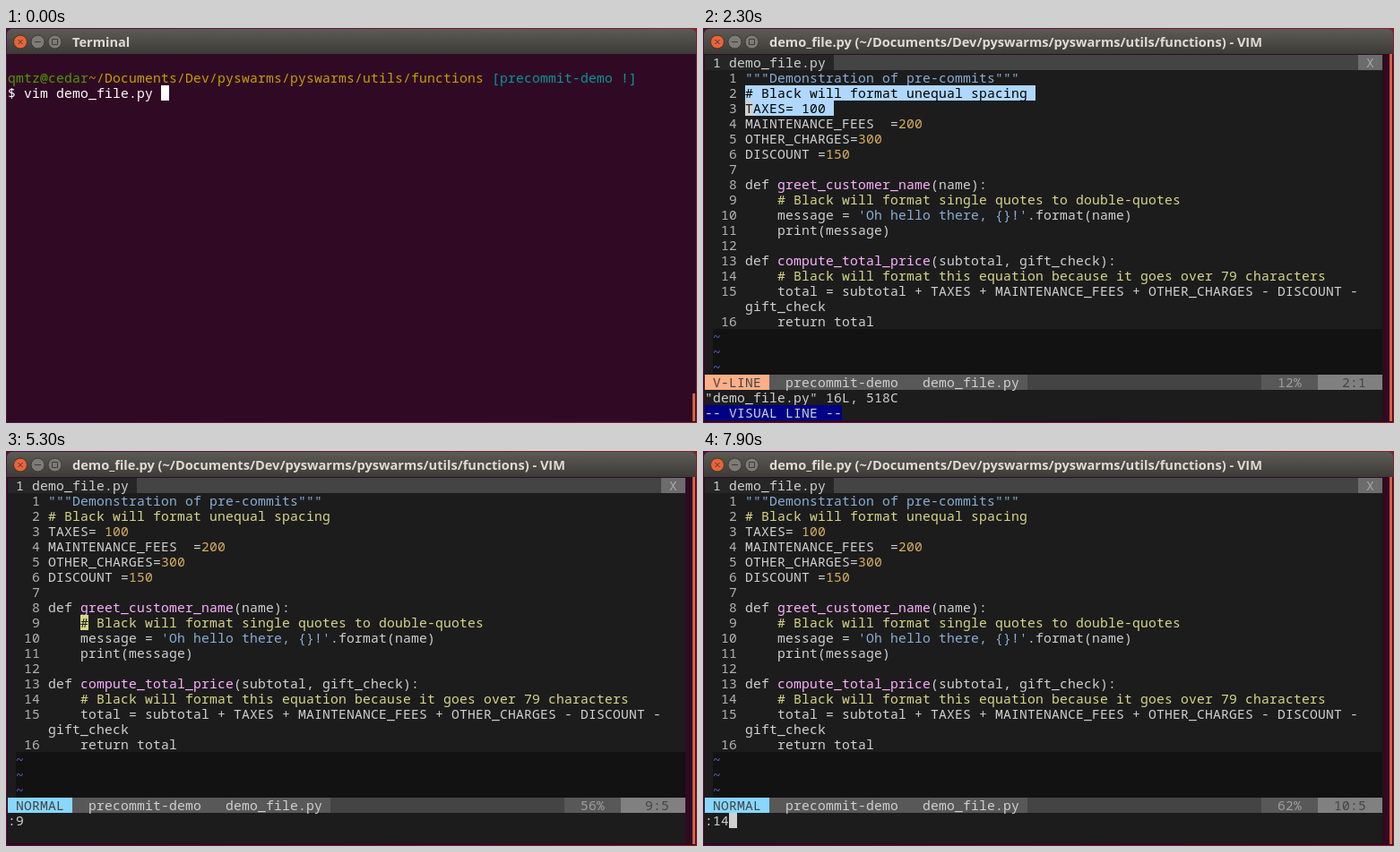
Recreate the animation shown at these times as an HTML page with a canvas. Size 771 by 441 pixels, loop 8000 ms.

```html
<!DOCTYPE html>
<html lang="en">
<head>
<meta charset="utf-8">
<title>Terminal</title>
<style>
html, body { margin: 0; width: 100%; height: 100%; overflow: hidden; background: #300a24; }
canvas { display: block; }
</style>
</head>
<body>
<canvas id="stage" width="771" height="441"></canvas>
<script>
const ctx = document.getElementById('stage').getContext('2d');
const LOOP = 8000;
const X0 = 2, Y0 = 30, CW = 9, CH = 17, COLS = 84, TEXT_COL = 5;
const MONO = '14.67px "Noto Sans Mono", "DejaVu Sans Mono", monospace';
const TITLE = 'bold 14.6px "Open Sans", "Noto Sans", sans-serif';

const BG = '#300a24', VIM = '#1c1c1c', FG = '#d0d0d0';
const COMMENT = '#d7d787', STR = '#87afd7', NUM = '#d7af5f', FUNC = '#ffafff';
const SELECT = '#afd7ff';

// Each line is a list of [text, colour] runs.
const CODE = [
  [['"""Demonstration of pre-commits"""', STR]],
  [['# Black will format unequal spacing', COMMENT]],
  [['TAXES= '], ['100', NUM]],
  [['MAINTENANCE_FEES  ='], ['200', NUM]],
  [['OTHER_CHARGES='], ['300', NUM]],
  [['DISCOUNT ='], ['150', NUM]],
  [],
  [['def '], ['greet_customer_name', FUNC], ['(name):']],
  [['    # Black will format single quotes to double-quotes', COMMENT]],
  [['    message = '], ["'Oh hello there, {}!'", STR], ['.format(name)']],
  [['    print(message)']],
  [],
  [['def '], ['compute_total_price', FUNC], ['(subtotal, gift_check):']],
  [['    # Black will format this equation because it goes over 79 characters', COMMENT]],
  [['    total = subtotal + TAXES + MAINTENANCE_FEES + OTHER_CHARGES - DISCOUNT -']],
  [['    return total']]
];
const WRAP_LINE = 15, WRAP_TEXT = 'gift_check';
const FILE_MSG = '"demo_file.py" 16L, 518C';

// Editor states: each entry changes some fields at its time.
const STEPS = [
  [700, { line: 2, col: 0, pos: 2, from: 0, cmd: FILE_MSG, typing: false, on: true }],
  [1800, { from: 2 }],
  [2300, { line: 3 }],
  [2400, { pos: 3 }],
  [2700, { line: 4, pos: 4 }],
  [3100, { line: 5, pos: 5 }],
  [3600, { line: 6, pos: 6 }],
  [4000, { on: false }],
  [4200, { on: true }],
  [4700, { from: 0 }],
  [4800, { cmd: ':', typing: true }],
  [5100, { cmd: ':9' }],
  [5300, { line: 9, pos: 9, col: 4, typing: false }],
  [6000, { from: 9 }],
  [6200, { line: 10, pos: 10 }],
  [6800, { on: false }],
  [7000, { on: true }],
  [7300, { from: 0, cmd: ':', typing: true }],
  [7700, { cmd: ':1' }],
  [7900, { cmd: ':14' }]
];

function rect(x, y, w, h, color) {
  ctx.fillStyle = color;
  ctx.fillRect(x, y, w, h);
}

function cells(col, row, n, color) {
  rect(X0 + col * CW, Y0 + row * CH, n * CW, CH, color);
}

function put(col, row, text, color = FG) {
  ctx.font = MONO;
  ctx.fillStyle = color;
  for (let i = 0; i < text.length; i++) {
    if (text[i] !== ' ') ctx.fillText(text[i], X0 + (col + i) * CW, Y0 + row * CH + 14);
  }
}

function label(col, row, text, color, bg) {
  cells(col, row, text.length, bg);
  put(col, row, text, color);
}

function button(x, fill, ring, mark) {
  const y = 15.5;
  ctx.beginPath();
  ctx.arc(x, y, 7.5, 0, Math.PI * 2);
  ctx.fillStyle = fill;
  ctx.fill();
  ctx.lineWidth = 1;
  ctx.strokeStyle = ring;
  ctx.stroke();
  ctx.beginPath();
  if (mark === 'close') {
    ctx.moveTo(x - 2.5, y - 2.5);
    ctx.lineTo(x + 2.5, y + 2.5);
    ctx.moveTo(x + 2.5, y - 2.5);
    ctx.lineTo(x - 2.5, y + 2.5);
  } else if (mark === 'min') {
    ctx.moveTo(x - 3.5, y);
    ctx.lineTo(x + 3.5, y);
  } else {
    ctx.rect(x - 3, y - 3, 6, 6);
  }
  ctx.strokeStyle = '#3c3b37';
  ctx.stroke();
}

function drawWindow(title, thumbTop) {
  const edge = ctx.createLinearGradient(0, 0, 771, 0);
  edge.addColorStop(0, '#4b1240');
  edge.addColorStop(1, '#84222c');
  rect(0, 0, 771, 441, edge);
  rect(1, 20, 769, 420, BG);

  const bar = ctx.createLinearGradient(0, 1, 0, 29);
  bar.addColorStop(0, '#5c5b55');
  bar.addColorStop(1, '#3c3b37');
  ctx.fillStyle = bar;
  ctx.beginPath();
  ctx.roundRect(1, 1, 769, 28, [6, 6, 0, 0]);
  ctx.fill();

  button(16, '#e8633a', '#4a3028', 'close');
  button(35.5, '#7d7b73', '#3a3935', 'min');
  button(54.5, '#7d7b73', '#3a3935', 'max');
  ctx.font = TITLE;
  ctx.fillStyle = '#dfdbd2';
  ctx.fillText(title, 74, 21);

  rect(766, thumbTop, 3, 439 - thumbTop, '#d9603f');
}

function drawShell(t) {
  drawWindow('Terminal', t < 600 ? 408 : 29);
  put(0, 1, 'qmtz@cedar', '#4e9a06');
  put(10, 1, '~/Documents/Dev/pyswarms/pyswarms/utils/functions', '#c4a000');
  put(60, 1, '[precommit-demo !]', '#06989a');
  put(0, 2, '$ vim demo_file.py', '#ffffff');
  if (t < 400) cells(19, 2, 1, '#ffffff');
  else cells(0, 3, 1, '#ffffff');
}

function rowOf(line) {
  return line > WRAP_LINE ? line + 1 : line;
}

function drawCode(s) {
  CODE.forEach((runs, i) => {
    const line = i + 1, row = rowOf(line);
    const picked = s.from && line >= s.from && line <= s.line;
    const text = runs.map(r => r[0]).join('');
    put(1, row, String(line).padStart(3), '#b2b2b2');
    if (picked) cells(TEXT_COL, row, text.length + 1, SELECT);
    let col = TEXT_COL;
    for (const [part, color] of runs) {
      put(col, row, part, picked ? '#000000' : color);
      col += part.length;
    }
    if (line === s.line && !s.typing) {
      const color = text[0] === '#' || text[s.col] === '#' ? COMMENT : FG;
      label(TEXT_COL + s.col, row, text[s.col], s.on ? VIM : color, s.on ? color : VIM);
    }
  });
  put(TEXT_COL, WRAP_LINE + 1, WRAP_TEXT);
}

function drawStatus(s) {
  const visual = s.from > 0;
  const percent = Math.floor(s.pos * 100 / CODE.length) + '%';
  cells(0, 21, COLS, '#444444');
  label(0, 21, visual ? ' V-LINE ' : ' NORMAL ', '#444444', visual ? '#ffaf87' : '#87d7ff');
  label(8, 21, '  precommit-demo   demo_file.py ', FG, '#585858');
  label(69, 21, '  ' + percent + '  ', '#9e9e9e', '#585858');
  label(76, 21, (s.pos + ':' + (s.col + 1)).padStart(6) + '  ', '#444444', '#808080');
  put(0, 22, s.cmd);
  if (s.typing) cells(s.cmd.length, 22, 1, FG);
  if (visual) label(0, 23, '-- VISUAL LINE --', FG, '#000087');
}

function drawEditor(t) {
  const s = {};
  for (const [at, change] of STEPS) if (t >= at) Object.assign(s, change);
  drawWindow('demo_file.py (~/Documents/Dev/pyswarms/pyswarms/utils/functions) - VIM', 29);
  rect(X0, Y0, COLS * CW, 24 * CH, VIM);

  cells(0, 0, COLS, '#444444');
  label(0, 0, ' 1 demo_file.py ', FG, '#262626');
  label(81, 0, ' X ', '#a8a8a8', '#6c6c6c');

  drawCode(s);
  for (let row = 18; row < 21; row++) {
    cells(1, row, COLS - 1, '#121212');
    put(1, row, '~', '#5f5fd7');
  }
  drawStatus(s);
}

function frame(now) {
  const t = now % LOOP;
  if (t < 700) drawShell(t);
  else drawEditor(t);
  requestAnimationFrame(frame);
}
requestAnimationFrame(frame);
</script>
</body>
</html>
```
